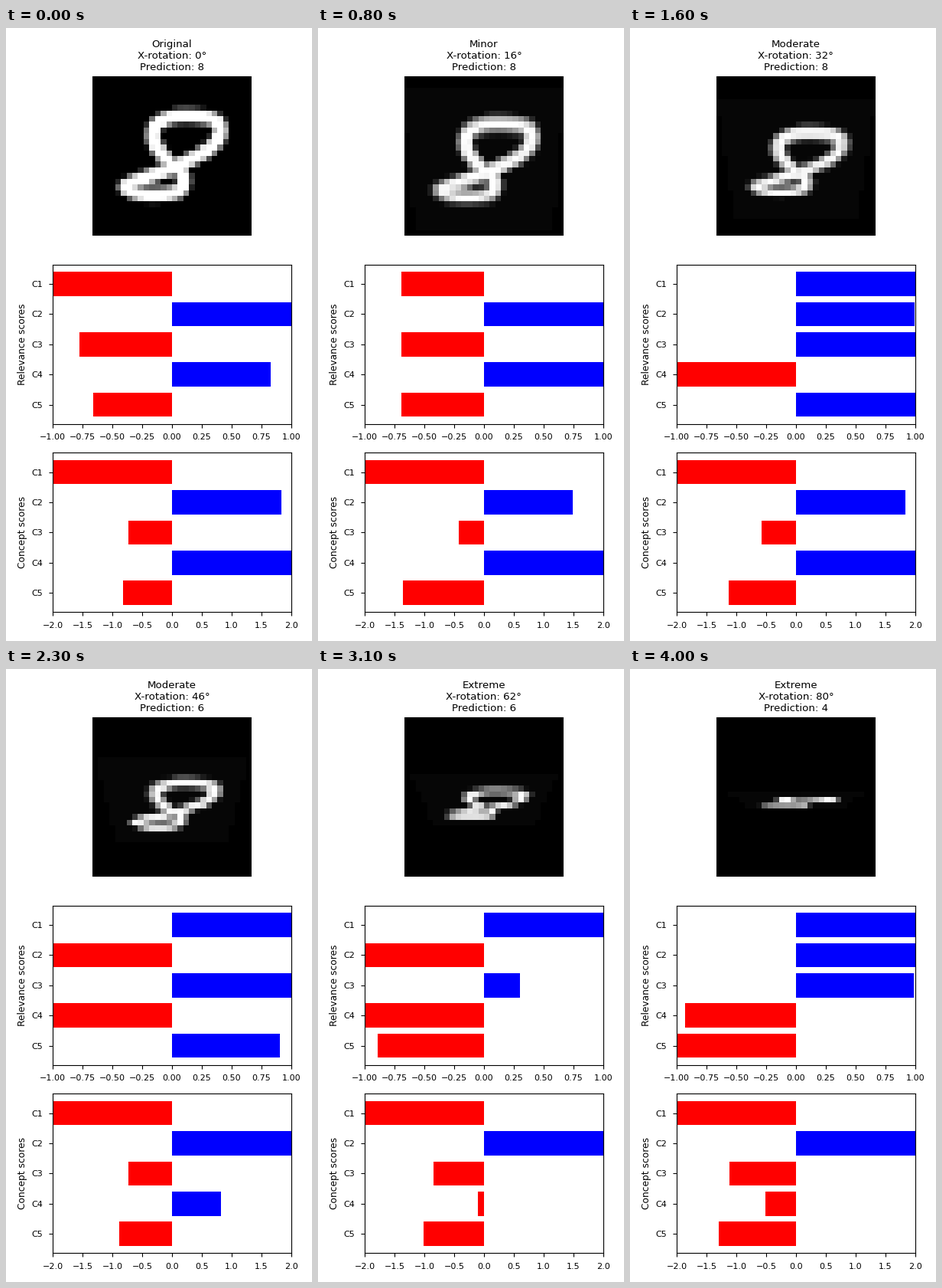
Write a matplotlib script that moves like this. It is 400 by 800 pixels and loops after 4100 ms.

```python
import numpy as np
import matplotlib.pyplot as plt
from matplotlib.animation import FuncAnimation

W, H, DPI = 400, 800, 100
FRAMES, INTERVAL = 41, 100
SIZE = 28
MID = (SIZE - 1) / 2
ROW_TOP, ROW_STEP, ROW_HEIGHT = 63.2, 245.6, 208

plt.rcParams.update({
    "font.family": "DejaVu Sans",
    "axes.titlesize": 9.6, "axes.labelsize": 8.8,
    "xtick.labelsize": 8, "ytick.labelsize": 8,
    "xtick.major.pad": 5.6, "ytick.major.pad": 5.6,
})

# Closed pen path of the digit, in grid cells (column, row)
PEN = np.array([
    (13.7, 15.5), (17, 14), (20.3, 12), (22, 9.3), (20.6, 7), (14.5, 6.5),
    (10.8, 8), (10.4, 11), (12.8, 14.4), (15.4, 16.8), (14.6, 19.7),
    (9, 20.3), (5.3, 18.9), (9.5, 17.1),
])


def smooth_loop(points, per_segment=30):
    """Closed Catmull-Rom curve through the points."""
    t = np.linspace(0, 1, per_segment, endpoint=False)[:, None]
    tangent = (np.roll(points, -1, 0) - np.roll(points, 1, 0)) / 2
    parts = []
    for i in range(len(points)):
        a, b = points[i - 1], points[i]
        ta, tb = tangent[i - 1], tangent[i]
        ease = t * t * (3 - 2 * t)
        parts.append(a + (b - a) * ease + ta * t * (1 - t) ** 2 - tb * t * t * (1 - t))
    return np.concatenate(parts)


def draw_digit():
    rows, cols = np.mgrid[:SIZE, :SIZE]
    x, y = smooth_loop(PEN).T
    dist = np.hypot(cols[..., None] - x, rows[..., None] - y).min(-1)
    return np.clip(1.72 - dist, 0, 1)


def sample(img, x, y):
    """Bilinear lookup, zero outside the grid."""
    inside = (x > 0) & (x < SIZE - 1) & (y > 0) & (y < SIZE - 1)
    x, y = np.where(inside, x, 0), np.where(inside, y, 0)
    i, j = y.astype(int), x.astype(int)
    fy, fx = y - i, x - j
    top = img[i, j] * (1 - fx) + img[i, j + 1] * fx
    low = img[i + 1, j] * (1 - fx) + img[i + 1, j + 1] * fx
    return np.where(inside, top * (1 - fy) + low * fy, 0)


def tilt(img, degrees):
    """Rotate the plane about the x axis under perspective."""
    if degrees == 0:
        return img
    a = np.radians(degrees)
    sin, cos = np.sin(a), np.cos(a)
    depth, slope, squeeze = 1 + .38 * sin ** 2, .02 * sin, cos ** 1.15
    shift = .5 + 1.2 * np.sin(2 * a)
    rows, cols = np.mgrid[:SIZE, :SIZE] - MID

    def to_plane(v):
        y = v * depth / (squeeze - v * slope)
        return cols * (depth + slope * y), y

    out = np.zeros((SIZE, SIZE))
    for offset in np.linspace(-.5, .5, 7) * (1 - cos):
        x, y = to_plane(rows + offset - shift)
        out += sample(img, x + MID, y + MID)
    x, y = to_plane(rows - shift)
    lit = (abs(x) < MID) & (abs(y) < MID)
    return np.maximum(out / out.max(), .027 * lit)


def relevance_bar(step, side, flips, sags):
    """Beyond the limit on one side; flips change side, sags shorten the bar."""
    size = 1.5
    for at, depth in sags:
        size -= depth * np.exp(-((step - at) / 3) ** 2)
    for at in flips:
        side *= np.tanh(at - step)
    return side * size


def relevance_scores(step):
    return [
        relevance_bar(step, -1, [8.5], []),
        relevance_bar(step, 1, [16.8, 36], []),
        relevance_bar(step, -1, [8.5], [(0, .725), (31, 1.2), (40, .51)]),
        relevance_bar(step, 1, [14], [(0, .67), (40, .57)]),
        relevance_bar(step, -1, [8.5, 23.7], [(0, .84), (31, .61)]),
    ]


def concept_scores(step):
    start = min(step / 4, 1)
    since = max(step - 4, 0)
    dip = start * max(1 - (since / 19) ** 1.3, 0)
    late = (max(step - 23, 0) / 17) ** 1.6
    return [
        -2.5,
        1.83 - .64 * start + .98 * (1 - np.exp(-since / 11)),
        -.73 + .345 * dip - .385 * late,
        20.2 * np.exp(-step / 9) - .75,
        -.82 - .003 * step - .59 * dip - .36 * late,
    ]


def title(step):
    angle = 2 * step
    level = ("Original" if angle == 0 else "Minor" if angle <= 30
             else "Moderate" if angle <= 60 else "Extreme")
    digit = 8 if step <= 20 else 6 if step < 37 else 4
    return f"{level}\nX-rotation: {angle}°\nPrediction: {digit}"


fig = plt.figure(figsize=(W / DPI, H / DPI), dpi=DPI, facecolor="white")


def add_axes(row, left, width):
    bottom = ROW_TOP + row * ROW_STEP + ROW_HEIGHT
    return fig.add_axes([left / W, 1 - bottom / H, width / W, ROW_HEIGHT / H])


def add_bars(row, label, limit):
    ax = add_axes(row, 61.2, 311.7)
    bars = ax.barh(range(5), [limit] * 5, height=.8)
    ax.set_yticks(range(5), [f"C{i}" for i in range(1, 6)])
    ax.set_ylim(4.64, -.64)
    ax.set_xlim(-limit, limit)
    ax.set_xticks(np.linspace(-limit, limit, 9))
    ax.set_ylabel(label)
    return bars


def set_bars(bars, values):
    for bar, value in zip(bars, values):
        bar.set_width(value)
        bar.set_facecolor("red" if value < 0 else "blue")


digit = draw_digit()
view = add_axes(0, 113, 207.8)
view.axis("off")
picture = view.imshow(digit, cmap="gray", vmin=0, vmax=1,
                      interpolation="nearest", aspect="auto")
heading = view.set_title(title(0))
relevance = add_bars(1, "Relevance scores", 1)
concept = add_bars(2, "Concept scores", 2)


def update(step):
    picture.set_data(tilt(digit, 2 * step))
    heading.set_text(title(step))
    set_bars(relevance, relevance_scores(step))
    set_bars(concept, concept_scores(step))
    return [picture, heading, *relevance, *concept]


anim = FuncAnimation(fig, update, frames=FRAMES, interval=INTERVAL,
                     repeat=True, repeat_delay=0, blit=False)
plt.show()
```
